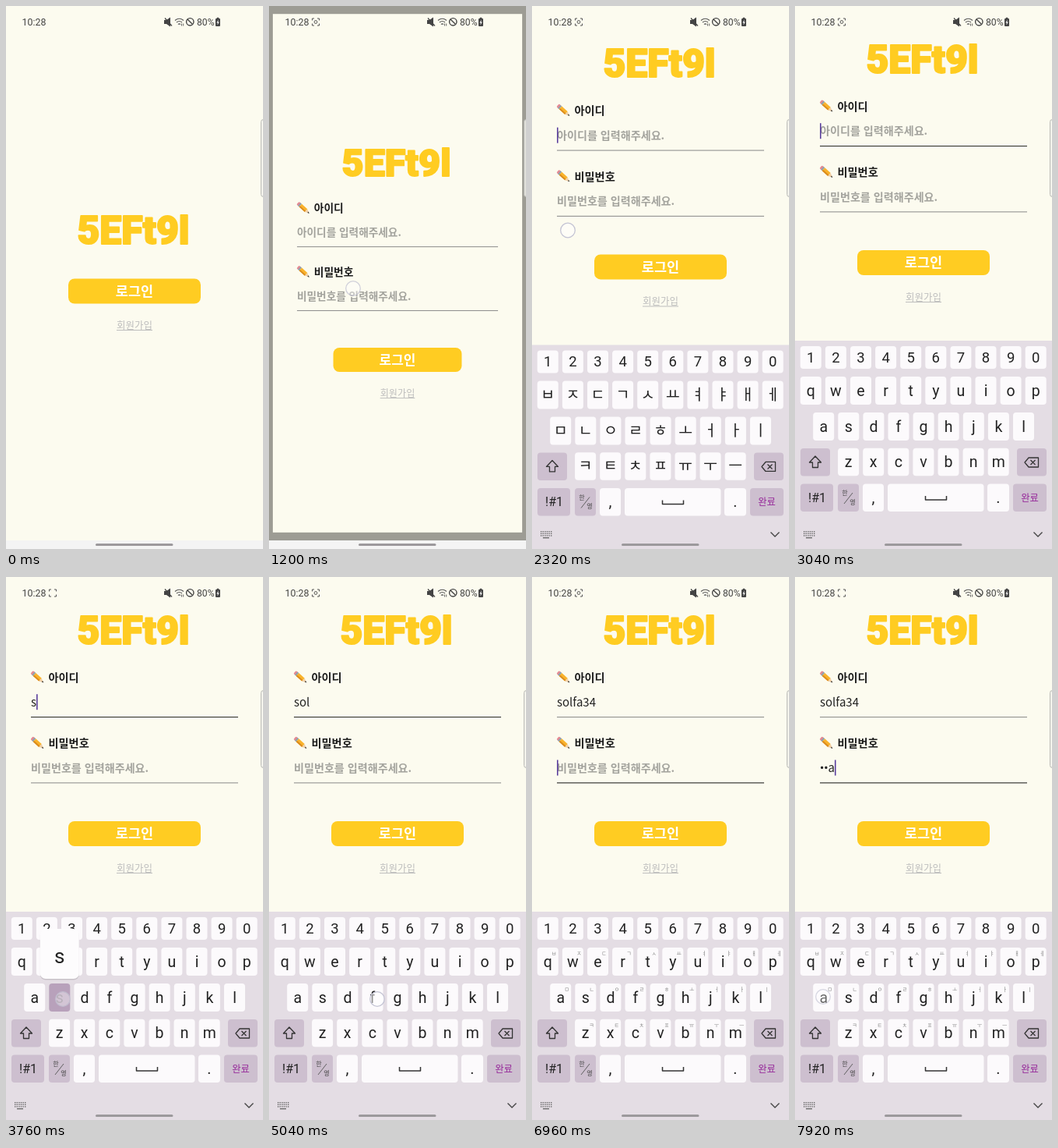
Recreate the animation shown at these times as an HTML page. Size 330 by 696 pixels, loop 8 s.

```html
<!DOCTYPE html>
<html lang="ko">
<head>
<meta charset="utf-8">
<style>
  html, body { margin: 0; width: 100%; height: 100%; overflow: hidden; background: #fcfbef; }
  svg { display: block; width: 330px; height: 696px; }
  text { font-family: Roboto, "Noto Sans CJK KR", "Noto Sans CJK", sans-serif; white-space: pre; }
  .ko { font-family: "Noto Sans CJK KR", "Noto Sans CJK", sans-serif; }
  .mid { text-anchor: middle; }
</style>
</head>
<body>
<svg id="stage" viewBox="0 0 330 696"></svg>
<script>
const LOOP = 8000, NS = 'http://www.w3.org/2000/svg';
const PAPER = '#fcfbef', GOLD = '#ffcc22', KEY = '#fcfafc', SPECIAL = '#cdbfcf', INK = '#222';
const stage = document.getElementById('stage');

function set(el, attrs) {
  for (const k in attrs) el.setAttribute(k, attrs[k]);
  return el;
}
function add(parent, tag, attrs) {
  return parent.appendChild(set(document.createElementNS(NS, tag), attrs));
}
const group = (parent, attrs = {}) => add(parent, 'g', attrs);
const rect = (parent, x, y, width, height, rx, fill, more) =>
  add(parent, 'rect', { x, y, width, height, rx, fill, ...more });
function text(parent, str, x, y, size, fill, more) {
  const el = add(parent, 'text', { x, y, 'font-size': size, fill, ...more });
  el.textContent = str;
  return el;
}
// Korean text placed by its vertical centre
const korean = (parent, str, x, cy, size, fill, weight, cls = '') =>
  text(parent, str, x, cy + size * 0.37, size, fill, { 'font-weight': weight, class: 'ko ' + cls });
const stroke = (parent, d, color = '#333', w = 1.3, more) =>
  add(parent, 'path', { d, fill: 'none', stroke: color, 'stroke-width': w, 'stroke-linejoin': 'round', ...more });
const show = (el, on) => el.setAttribute('visibility', on ? 'visible' : 'hidden');

// Piecewise linear value from [time, value] steps
function track(steps, t) {
  if (t <= steps[0][0]) return steps[0][1];
  for (let i = 1; i < steps.length; i++) {
    const [a, u] = steps[i - 1], [b, v] = steps[i];
    if (t < b) return u + (v - u) * (t - a) / (b - a);
  }
  return steps[steps.length - 1][1];
}

// ---- Pages ----
function brand(parent, base) {
  text(parent, '5EFt9l', 163.5, base, 50, GOLD, {
    'font-weight': 900, class: 'mid', stroke: GOLD, 'stroke-width': 2, 'stroke-linejoin': 'round'
  });
}
function actions(parent, top, linkY) {
  rect(parent, 80, top, 170, 32, 8, GOLD);
  korean(parent, '로그인', 165, top + 16, 17.5, '#fff', 700, 'mid');
  korean(parent, '회원가입', 165, linkY, 12.5, '#bdbdbd', 400, 'mid');
  rect(parent, 142, linkY + 6, 46, 1, 0, '#bdbdbd');
}
function pencil(parent, x, y) {
  const g = group(parent, { transform: `translate(${x} ${y}) rotate(42)` });
  rect(g, -10, -2.6, 4, 5.2, 1.5, '#e58a94');
  rect(g, -7.5, -2.6, 2.2, 5.2, 0, '#8fa3ad');
  rect(g, -5.3, -2.6, 10, 5.2, 0, '#f9b32c');
  rect(g, -5.3, 0.8, 10, 1.8, 0, '#d98a1e');
  add(g, 'path', { d: 'M4.7-2.6L10 0 4.7 2.6z', fill: '#f1cfa4' });
  add(g, 'path', { d: 'M8-1L10.6 0 8 1z', fill: '#333' });
}
function field(parent, label, hint, cy) {
  pencil(parent, 40.5, cy);
  korean(parent, label, 54.5, cy, 14.2, '#1c1c1c', 700);
  const y = cy + 31.7;
  return {
    y,
    hint: korean(parent, hint, 32, y, 14.1, '#a3a39d', 700),
    value: korean(parent, '', 32, y, 15, INK, 500),
    line: rect(parent, 32, cy + 50.6, 266, 1, 0, '#888')
  };
}

rect(stage, 0, 0, 330, 696, 0, PAPER);
const home = group(stage);
brand(home, 305);
actions(home, 349.5, 409);
const dim = rect(stage, 0, 0, 330, 685, 0, '#000');

const login = group(stage);
rect(login, 0, 0, 330, 685, 0, PAPER);
const form = group(login);
brand(form, 214);
const idField = field(form, '아이디', '아이디를 입력해주세요.', 256.5);
const pwField = field(form, '비밀번호', '비밀번호를 입력해주세요.', 340.8);
actions(form, 441, 501);
const caret = rect(form, 32, 0, 1.6, 20, 0, '#5b3f9e');

rect(stage, 0, 685, 330, 11, 0, '#f4f4f4');

// ---- Keyboard ----
const board = group(stage);
rect(board, 0, 429, 330, 267, 0, '#e4dde4');
const keys = {};
const rows = [
  ['1234567890', '', 20.3, 450.5, 29],
  ['qwertyuiop', 'ㅂㅈㄷㄱㅅㅛㅕㅑㅐㅔ', 20.3, 493, 36],
  ['asdfghjkl', 'ㅁㄴㅇㄹㅎㅗㅓㅏㅣ', 36.7, 539, 36],
  ['zxcvbnm', 'ㅋㅌㅊㅍㅠㅜㅡ', 68.6, 584.5, 35.5]
];
for (const [latin, jamo, x0, y, h] of rows) {
  [...latin].forEach((c, i) => {
    const x = x0 + i * 32.1;
    keys[c] = {
      c, x, top: y - h / 2, jamo: jamo[i],
      back: rect(board, x - 13.5, y - h / 2, 27, h, 4, KEY),
      face: text(board, c, x, y + 6.5, jamo ? 19.5 : 18.5, INK, { class: 'mid' }),
      mini: jamo && text(board, jamo[i], x + 8, y - 8, 7, '#888', { class: 'mid' })
    };
  });
}
rect(board, 7, 567, 38, 35.5, 4, SPECIAL);
stroke(board, 'M26 577l-7.5 8h4v6.5h7v-6.5h4z');
rect(board, 285, 567, 38, 35.5, 4, SPECIAL);
stroke(board, 'M295 585l5-6h12.5v12h-12.5zM302.5 582l6 6m0-6l-6 6');
const bottom = [[7, 42, SPECIAL], [55, 27, SPECIAL], [87, 27, KEY], [119, 123.5, KEY], [247, 28, KEY], [280, 43, SPECIAL]];
for (const [x, w, fill] of bottom) rect(board, x, 612.5, w, 35.5, 4, fill);
text(board, '!#1', 28.5, 636, 16, INK, { class: 'mid' });
korean(board, '한', 64, 624.5, 8, '#444', 400, 'mid');
korean(board, '영', 74, 636, 8, '#444', 400, 'mid');
stroke(board, 'M63 638l11-14', '#555', 0.9);
text(board, ',', 100.5, 637, 20, INK, { class: 'mid' });
text(board, '.', 261, 637, 20, INK, { class: 'mid' });
stroke(board, 'M167.5 628v5h27v-5', '#333', 1.5);
korean(board, '완료', 301.5, 630, 12.3, '#96289a', 400, 'mid');

const tools = group(stage);
for (let r = 0; r < 3; r++)
  for (let c = 0; c < 6; c++) rect(tools, 11 + c * 2.6, 673 + r * 2.6, 1.4, 1.4, 0, '#666');
rect(tools, 14, 681, 8, 1.3, 0, '#666');
stroke(tools, 'M306.5 674.5l5.5 5.5 5.5-5.5', '#444', 1.4);
rect(stage, 115, 689, 99.5, 3, 1.5, '#9c999c');

// ---- Key bubble, touch dot, edge handle ----
const bubble = group(stage);
rect(bubble, -25, 1.5, 50, 64, 7, '#000', { opacity: 0.12 });
rect(bubble, -25, 0, 50, 64, 7, '#fdfcfd');
const bubbleText = text(bubble, '', 0, 44, 26, INK, { class: 'mid' });
const dot = add(stage, 'circle', { r: 9.3, fill: '#fff', 'fill-opacity': 0.5, stroke: '#c4c4d4', 'stroke-width': 1.3 });
rect(stage, 327.5, 145.5, 8, 99, 3, '#f2f2ec', { stroke: '#b9b9b5', 'fill-opacity': 0.8 });

// ---- Status bar ----
text(stage, '10:28', 20.5, 25, 12.4, '#444');
const corners = stroke(stage, 'M55.5 18.5v-2.5h2.5m4 0h2.5v2.5m0 4v2.5h-2.5m-4 0h-2.5v-2.5', '#555', 1);
const eye = add(stage, 'circle', { cx: 60, cy: 20.5, r: 1.9, fill: 'none', stroke: '#555' });
add(stage, 'path', { d: 'M203 18h3l5-3.5v12l-5-3.5h-3z', fill: '#444' });
stroke(stage, 'M204 15.5l9 10', '#444', 1.2);
stroke(stage, 'M217 18.5q5.5-4.5 11 0M219 21q3.5-3 7 0M221 23.5q1.5-1.3 3 0', '#555', 1.2);
stroke(stage, 'M225.5 25.5v-3m2.2 3v-3', '#555', 0.9);
add(stage, 'circle', { cx: 236.3, cy: 20.3, r: 4.7, fill: 'none', stroke: '#444', 'stroke-width': 1.4 });
stroke(stage, 'M233 17l6.6 6.6', '#444', 1.4);
text(stage, '80%', 245, 25, 12.2, '#444');
rect(stage, 269, 16, 6, 10, 1, '#444');
rect(stage, 270.7, 14.8, 2.6, 1.5, 0, '#444');
add(stage, 'path', { d: 'M272.7 17.5l-2.3 4h1.5l-.5 3 2.4-4h-1.6z', fill: '#fff' });

// ---- Timeline ----
// Taps: start, end, x, y, key
const taps = [
  [720, 1340, 108, 362], [1760, 2520, 46, 287.5], [2720, 3000, 69, 631],
  [3600, 3900, 73, 541, 's'], [3920, 4200, 277, 495, 'o'], [4320, 4680, 291, 540, 'l'],
  [5020, 5300, 139, 541, 'f'], [5340, 5620, 38, 540, 'a'], [5680, 5940, 85, 453, '3'],
  [6000, 6320, 117, 453, '4'], [6560, 6900, 62, 245],
  [7120, 7380, 70, 540, 's'], [7440, 7660, 70, 540, 's'], [7700, 8040, 36, 538, 'a']
];
const ID_FOCUS = 1900, PW_FOCUS = 6640, LATIN = 2960, DELAY = 40, HOLD = 200;
const zoom = [[960, 0.85], [1040, 0.91], [1120, 0.95], [1200, 0.97], [1300, 0.99], [1440, 1]];
const slide = [[1920, 267], [2000, 170], [2080, 90], [2160, 44], [2240, 18], [2320, 5.5], [2480, 0]];
const blinks = [[160, 720], [1440, 1920], [3520, 4000], [5600, 6080], [7680, 8000]];

function draw(t) {
  // Page change
  const s = track(zoom, t);
  show(home, t < 1440);
  dim.setAttribute('opacity', track([[960, 0], [1060, 0.38]], t));
  set(login, {
    opacity: track([[940, 0], [1060, 1]], t),
    transform: `translate(165 342.5) scale(${s}) translate(-165 -342.5)`
  });

  // Keyboard pushes the form up
  const off = track(slide, t);
  board.setAttribute('transform', `translate(0 ${off})`);
  show(board, off < 267);
  show(tools, off < 40);
  form.setAttribute('transform', `translate(0 ${Math.min(128, off) - 128})`);

  // Typing
  let id = '', pw = '', last = t < PW_FOCUS ? ID_FOCUS : PW_FOCUS, down = null, tap = null;
  for (const p of taps) {
    const [a, b, , , c] = p;
    if (t >= a && t < b) tap = p;
    if (!c || t < a + DELAY) continue;
    if (a < PW_FOCUS) id += c; else pw += c;
    last = Math.max(last, a + DELAY);
    if (t < a + HOLD) down = keys[c];
  }
  idField.value.textContent = id;
  pwField.value.textContent = '';
  if (pw) {
    for (const part of ['•'.repeat(pw.length - 1), pw.slice(-1)]) {
      const span = add(pwField.value, 'tspan', part[0] === '•' ? { 'font-family': 'Roboto, sans-serif' } : {});
      span.textContent = part;
    }
  }
  show(idField.hint, !id);
  show(pwField.hint, !pw);
  const inPw = t >= PW_FOCUS, cur = inPw ? pwField : idField;
  idField.line.setAttribute('fill', t > 2400 && !inPw ? '#222' : '#888');
  pwField.line.setAttribute('fill', inPw ? '#111' : '#888');
  const w = (inPw ? pw : id) ? cur.value.getComputedTextLength() : 0;
  set(caret, { x: 32 + w, y: cur.y - 10 });
  show(caret, t >= ID_FOCUS && (t - last) % 1000 < 500);

  // Key faces
  for (const k of Object.values(keys)) {
    const face = k.jamo && t < LATIN ? k.jamo : k.c;
    if (k.face.textContent !== face) k.face.textContent = face;
    k.back.setAttribute('fill', k === down ? '#b8a1bb' : KEY);
    k.face.setAttribute('fill', k === down ? '#8d8090' : INK);
    if (k.mini) k.mini.setAttribute('opacity', inPw ? 1 : 0);
  }
  bubble.setAttribute('display', down ? 'inline' : 'none');
  if (down) {
    const x = Math.min(299, Math.max(31, down.x));
    bubble.setAttribute('transform', `translate(${x} ${down.top - 70})`);
    bubbleText.textContent = down.c;
  }

  // Touch dot fades after lifting
  show(dot, tap);
  if (tap) set(dot, { cx: tap[2], cy: tap[3], opacity: Math.min(1, (tap[1] - t) / 180) });

  corners.setAttribute('opacity', track([[80, 0], [320, 1]], t));
  show(eye, t > 160 && !blinks.some(([a, b]) => t >= a && t < b));
}

const start = performance.now();
function tick() {
  draw((performance.now() - start) % LOOP);
  requestAnimationFrame(tick);
}
tick();
</script>
</body>
</html>
```
